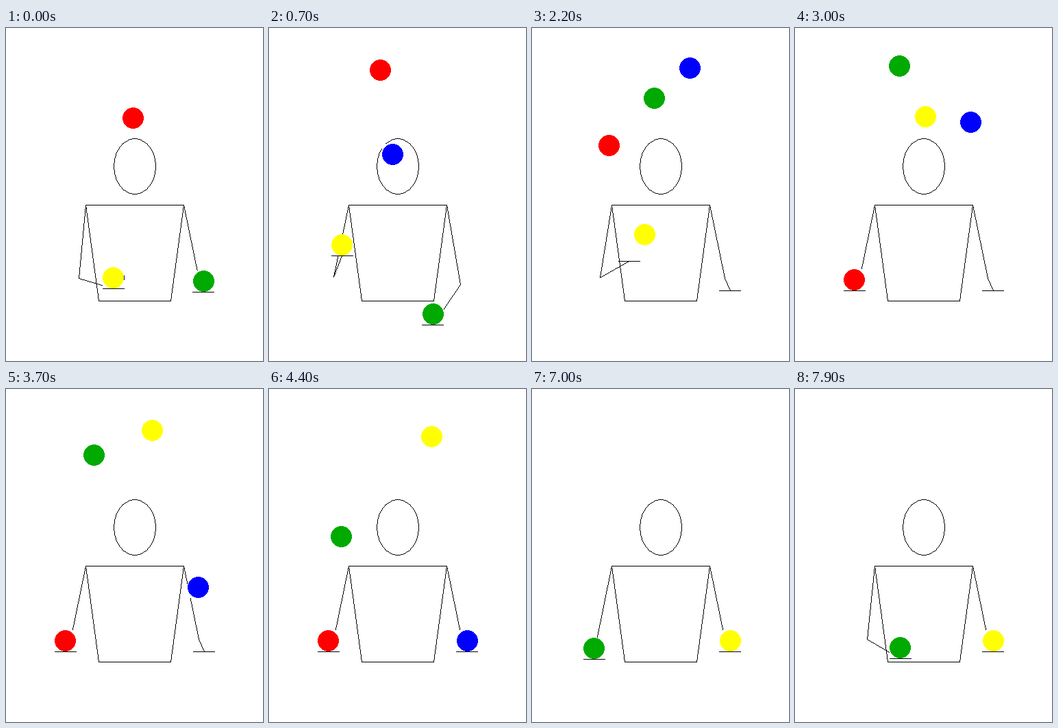
An HTML page with a canvas that plays this animation: 375 px wide and 486 px high, repeating every 8 s.

```html
<!DOCTYPE html>
<html lang="en">
<head>
<meta charset="utf-8">
<title>Juggler</title>
<style>
  html, body { margin: 0; width: 100%; height: 100%; overflow: hidden; background: #fff; }
  canvas { display: block; }
</style>
</head>
<body>
<canvas id="stage" width="375" height="486"></canvas>
<script>
const ctx = document.getElementById('stage').getContext('2d');
const LOOP = 8000, STEP = 100;   // ms
const BEAT = 9.943;              // steps between throws
const START = -0.1;              // step of the throw on beat 0
const FLIGHT = 4 * BEAT;
const RADIUS = 15;
const REST = { x: 86, y: 383 };
const SCOOP = { width: 70.3, height: 61.9 };

// Each ball is thrown once, on its own beat, and crosses to the other hand.
const balls = [
  { color: '#f00', beat: -1, fromLeft: false },
  { color: '#00f', beat: 0, fromLeft: true },
  { color: '#0a0', beat: 1, fromLeft: false },
  { color: '#ff0', beat: 2, fromLeft: true }
];

const mirror = x => 375 - x;

// Hard-edged one pixel line
function line(x0, y0, x1, y1) {
  const count = Math.max(1, Math.round(Math.max(Math.abs(x1 - x0), Math.abs(y1 - y0))));
  for (let i = 0; i <= count; i++) {
    const u = i / count;
    ctx.fillRect(Math.round(x0 + (x1 - x0) * u), Math.round(y0 + (y1 - y0) * u), 1, 1);
  }
}

function polygon(points) {
  points.forEach((p, i) => line(...p, ...points[(i + 1) % points.length]));
}

function ellipse(cx, cy, rx, ry) {
  const points = [];
  for (let i = 0; i < 72; i++) {
    const a = i * Math.PI / 36;
    points.push([Math.round(cx + rx * Math.cos(a)), Math.round(cy + ry * Math.sin(a))]);
  }
  polygon(points);
}

// The hand scoops inwards below its rest height and returns outwards above it.
function handAt(step, left) {
  const beat = (step - START) / BEAT, u = beat % 1;
  const scooping = left ? (beat >= 1 && beat < 2) || beat >= 7 : beat < 1;
  const returning = left ? beat < 1 || (beat >= 2 && beat < 3) : beat >= 1 && beat < 2;
  let { x, y } = REST;
  if (scooping || returning) {
    const arc = SCOOP.height * 4 * u * (1 - u);
    x += SCOOP.width * (scooping ? u : 1 - u);
    y += scooping ? arc : -arc;
  }
  x = Math.round(x);
  return { x: left ? x : mirror(x), y: Math.floor(y) };
}

function drawArm(hand, left) {
  const side = left ? x => x : mirror;
  const hx = side(hand.x);
  const ex = Math.max(94, (hx + 56) / 2);
  const ey = Math.max(hand.y - 59, 352.5 + 0.033 * hand.y);
  const elbow = [Math.round(side(ex)), Math.round(ey)];
  line(side(116), 258, ...elbow);
  line(...elbow, hand.x, hand.y);
  line(side(hx - 15), hand.y, side(hx + 16), hand.y);
}

function ballAt(ball, step, hands) {
  const age = step - START - ball.beat * BEAT;
  if (age >= 0 && age < FLIGHT) {
    const s = age - FLIGHT / 2;
    const x = Math.round(152.65 - 3.327 * s);
    return { x: ball.fromLeft ? mirror(x) : x, y: Math.floor(55.1 + 0.79 * s * s) };
  }
  const hand = ball.fromLeft === age < 0 ? hands.left : hands.right;
  return { x: hand.x, y: hand.y - 16 };
}

// A ball sits on an opaque white square.
function drawBall({ x, y }, color) {
  const size = 2 * RADIUS + 1;
  ctx.fillStyle = '#fff';
  ctx.fillRect(x - RADIUS, y - RADIUS, size, size);
  ctx.fillStyle = color;
  for (let dy = -RADIUS; dy <= RADIUS; dy++) {
    const half = Math.floor(Math.sqrt((RADIUS + 0.5) ** 2 - dy * dy));
    ctx.fillRect(x - half, y + dy, 2 * half + 1, 1);
  }
}

function draw(step) {
  const hands = { left: handAt(step, true), right: handAt(step, false) };
  ctx.fillStyle = '#fff';
  ctx.fillRect(0, 0, 375, 486);
  ctx.fillStyle = '#000';
  ellipse(187.5, 201.5, 30.4, 40.4);
  polygon([[116, 258], [259, 258], [240, 398], [135, 398]]);
  drawArm(hands.left, true);
  drawArm(hands.right, false);
  balls.forEach(ball => drawBall(ballAt(ball, step, hands), ball.color));
}

const begin = performance.now();
function tick() {
  draw(Math.floor((performance.now() - begin) % LOOP / STEP));
  requestAnimationFrame(tick);
}
tick();
</script>
</body>
</html>
```
